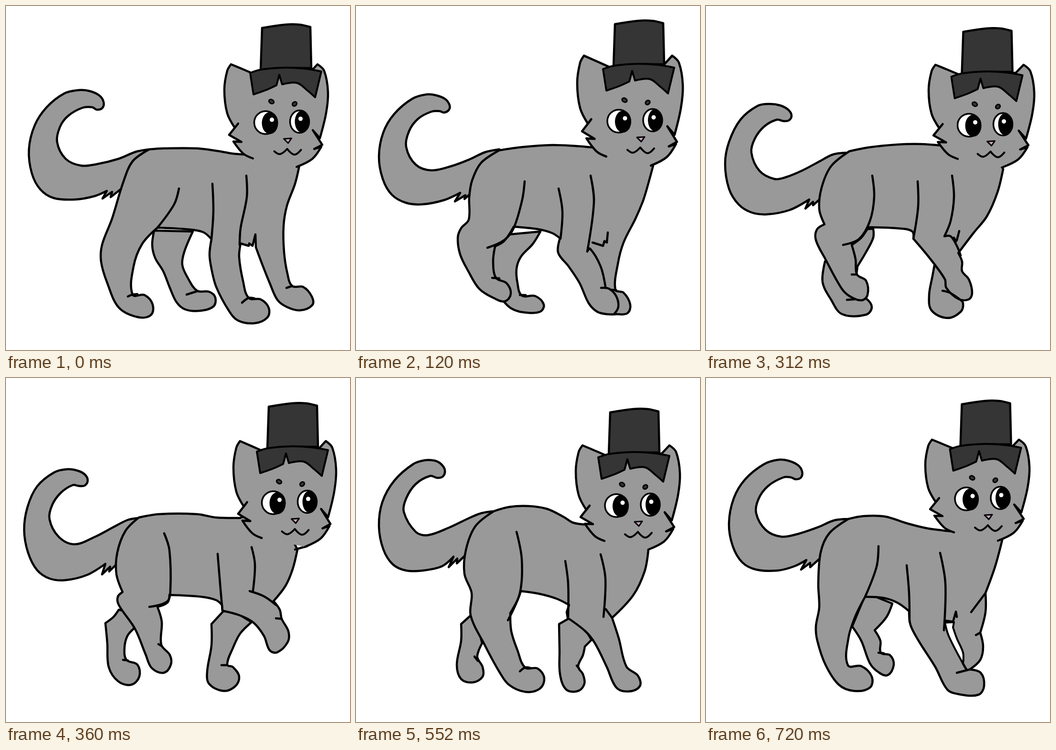
Write an HTML page with a canvas that moves like this. It is 720 by 720 pixels and loops after 0.84 s.

```html
<!DOCTYPE html>
<html>
<head>
<meta charset="utf-8">
<title>Walking cat</title>
<style>
html, body { margin: 0; height: 100%; overflow: hidden; background: #fff; }
canvas { display: block; }
</style>
</head>
<body>
<canvas id="stage" width="720" height="720"></canvas>
<script>
const ctx = document.getElementById('stage').getContext('2d');
const STEP = 120, FUR = '#999', HAT = '#353535';

// Smooth curve through "x,y" points; "!" after a point makes it a corner.
function curve(text) {
  const pts = text.trim().split(/\s+/).map(s => {
    const [x, y] = s.replace('!', '').split(',').map(Number);
    return { x, y, corner: s.endsWith('!') };
  });
  const last = pts.length - 1;
  const handle = (i, length) => {
    const p = pts[i], a = pts[i - 1], b = pts[i + 1];
    if (p.corner || !a || !b) return [p.x, p.y];
    const k = length / 3 / Math.hypot(b.x - a.x, b.y - a.y);
    return [p.x + (b.x - a.x) * k, p.y + (b.y - a.y) * k];
  };
  const path = new Path2D();
  path.moveTo(pts[0].x, pts[0].y);
  for (let i = 0; i < last; i++) {
    const p = pts[i], q = pts[i + 1], d = Math.hypot(q.x - p.x, q.y - p.y);
    path.bezierCurveTo(...handle(i, d), ...handle(i + 1, -d), q.x, q.y);
  }
  return path;
}
const closed = text => curve(text + ' ' + text.trim().split(/\s+/)[0]);

// head: left, top, scale x, scale y; face and hat: offsets
const poses = [
  {
    head: [458, 122, .995, .985], face: [-1.5, -23], hat: [4, -26],
    tail: '300,300! 272,305 235,320 190,331 157,334 125,320 107,285 113,253 130,230 160,213 181,212 190,217 202,213 204,200 195,187 175,178 152,176 122,183 85,212 60,250 48,300 54,350 72,384 100,402 145,405 185,398 211,387! 202,403! 222,389! 219,400! 242,382! 300,340!',
    far: ['310,470! 306,500 312,527 329,555 343,590 357,620 375,635 405,638 434,629 438,610 425,598 400,596 381,570 369,542 373,515 391,472!'],
    body: '300,300! 330,298 400,298 440,303 475,309 502,311! 560,260! 614,334! 605,372 588,418 581,460 582,515 589,560 599,586 622,588 640,608 641,626 615,637 588,630 568,615 552,580 536,540 523,505! 522,478! 516,502! 509,497! 508,502! 491,497! 488,525 496,575 508,611 533,614 550,632 547,652 520,664 485,658 466,637 440,588 430,550 426,520 430,488! 412,473 375,467 317,464! 285,498 267,545 265,604 290,605 307,625 303,647 275,651 236,631 212,580 199,535 201,500 222,445 245,370 265,325',
    lines: ['362,382 352,415 317,464', '432,372 434,430 430,488', '503,355 504,400 491,465 489,500', '255,608 265,604 275,603', '494,621 508,611 520,612', '587,590 599,586', '378,604 400,597']
  },
  {
    head: [464, 104, 1.014, 1.055], face: [5, -26], hat: [10, -34],
    tail: '300,300! 270,306 240,320 200,335 158,344 125,332 105,295 111,262 130,236 158,221 175,220 184,223 194,218 196,208 187,195 168,187 148,185 118,194 80,226 57,265 48,315 56,362 75,395 105,412 140,415 185,406 218,391! 207,409! 229,396! 227,404! 245,388! 300,340!',
    far: ['386,472! 370,498 345,525 336,550 338,580 347,606 375,607 393,625 385,640 350,641 325,633 308,617! 270,560! 300,480!'],
    body: '300,302! 350,295 410,291 460,293 495,296! 560,260! 622,334! 608,385 600,410 585,445 560,495 548,540 543,594 560,600 574,625 568,643 545,645 525,645 505,640 487,622 468,580 445,545 423,516 427,486! 410,475 380,467 330,462! 310,492 291,503! 287,535 293,569 315,580 324,602 312,618 290,612 258,592 235,555 218,520 213,485 220,465 236,447 237,400 243,365 262,328',
    lines: ['353,367 348,405 330,465 310,490 275,506', '424,382 432,430 428,487', '491,355 498,410 484,514! 490,508 512,545 522,587', '495,495 517,502! 520,492! 525,495! 527,474!', '513,590 530,592 545,608 549,630 540,645', '535,594 545,595', '285,569 300,570', '343,605 355,605']
  },
  {
    head: [467, 123, 1.014, .985], face: [5.5, -17.5], hat: [6.5, -18],
    tail: '292,307! 265,311 238,325 200,345 165,359 143,362 112,345 95,307 102,278 122,252 148,238 163,241 174,239 179,229 172,217 155,208 133,205 108,209 72,238 48,285 40,330 48,382 68,415 95,432 128,436 175,427 216,405! 208,424! 224,410! 224,417! 241,402! 300,350!',
    far: ['350,466! 350,485 335,515 317,545! 310,600! 335,612 347,630 335,646 285,645 262,615 244,578 249,535! 300,470!', '479,538! 474,565 467,605 472,637 505,653 533,640 538,622 530,613! 500,560!'],
    body: '300,304! 340,296 400,290 450,289 492,292! 560,260! 622,341! 610,390 588,440 560,475 528,517! 536,535 536,555 550,572 557,600 550,614 528,613 503,590 500,572 470,530 434,487! 432,472 410,466 340,463! 325,485 305,500! 313,530 316,562 335,575 338,605 325,616 300,607 283,590 250,530 230,490 232,468 248,457! 237,425 242,380 262,335',
    lines: ['348,355 352,400 343,450 320,488 287,500', '443,367 444,420 434,487', '515,355 519,400 512,450 499,482! 512,482 525,502 533,522', '495,596 510,600 530,613', '295,615 310,614', '305,562 316,562', '519,485 523,493! 525,490! 530,471!']
  },
  {
    head: [477, 132, .986, 1.015], face: [14.5, -6], hat: [18, -12],
    tail: '278,293! 255,297 225,312 185,333 143,348 110,332 91,295 97,265 115,240 140,224 153,226 165,225 171,214 165,202 150,194 127,191 100,198 65,227 45,270 38,318 46,365 65,402 92,420 125,423 170,412 208,389! 201,411! 218,395! 216,405! 232,389! 280,340!',
    far: ['236,485! 225,500 208,513! 212,555 215,605 235,635 262,642 279,625 275,600 252,590 248,565 254,540 268,524! 260,490!', '455,488! 430,515! 430,560 421,615 425,640 455,655 480,645 488,625 475,605 463,600 475,565 490,535 514,511! 480,490!'],
    body: '278,292! 320,285 400,285 440,292 490,293! 560,260! 610,359! 600,400 585,435 560,467! 573,485 577,504 591,530 590,552 568,574 552,570 540,540 518,512 490,497 453,487! 452,475! 440,465 410,458 342,454! 338,470 317,479! 326,510 325,558 343,580 345,600 330,617 305,607 292,578 270,525 236,475 234,458 244,448! 231,410 233,365 250,320',
    lines: ['331,325 342,360 344,445 337,468 300,479', '443,368 448,430 453,487', '514,354 521,390 517,445', '510,446 540,457 565,475', '565,503 577,504', '319,557 326,561', '245,590 255,591', '451,601 463,601', '630,352 605,359']
  },
  {
    head: [461, 141, 1, 1], face: [0, 0], hat: [0, 0],
    tail: '288,279! 262,283 235,294 195,313 150,329 125,322 100,280 105,252 125,222 155,205 170,209 182,206 186,193 178,180 165,173 145,172 120,180 80,215 55,260 48,310 57,358 77,390 105,403 140,403 180,394 204,374! 194,396! 212,378! 211,388! 230,370! 290,330!',
    far: ['240,497! 220,515! 220,550 211,600 220,630 245,637 265,625 265,605 254,585 257,570 264,555! 255,520!', '446,503! 425,515! 426,570 427,620 440,652 465,655 478,640 475,620 465,604 475,580 479,562! 493,548! 470,510!'],
    body: '288,279! 320,270 360,268 400,274 435,291 455,303 485,307! 560,260! 612,359! 604,405 580,455 536,502! 550,545 566,604 590,623 594,645 570,656 545,648 525,605 500,555 480,530 443,502! 441,490! 446,475! 420,462 385,452 345,446! 338,465 323,492! 325,530 338,570 354,606 380,608 394,628 385,650 355,657 320,642 300,615 270,560 240,497 242,450 227,410 230,360 250,310',
    lines: ['336,322 347,380 343,450 318,507', '438,383 444,430 444,500', '512,369 522,420 518,500', '523,484 536,502', '343,614 354,606 365,607', '462,602 467,608', '248,583 255,592']
  },
  {
    head: [461, 133, 1, 1], face: [0, -8], hat: [0, -7.5],
    tail: '295,286! 265,289 230,303 190,319 150,327 122,315 102,278 107,250 130,220 160,203 178,200 186,204 195,199 197,187 190,174 172,164 150,162 120,170 80,202 54,248 46,300 52,350 72,382 100,398 140,401 180,393 206,374! 195,397! 217,377! 213,389! 235,373! 290,330!',
    far: ['380,460! 362,483 317,506! 300,500! 330,450!', '314,526! 335,533 345,552 332,571 310,570! 290,550!'],
    body: '295,286! 330,278 370,276 410,284 440,297 460,306 485,308! 560,260! 615,352! 605,395 590,440 572,465! 566,495 540,537! 544,560 537,585! 548,603 578,605 590,630 583,653 550,661 522,655 500,615 470,560 440,515 436,475! 415,464 380,458 337,454! 322,480 310,520 306,560 312,601 340,604 357,628 345,652 310,656 280,645 255,605 235,550 233,515 240,480 241,445 233,408 238,365 258,318',
    lines: ['352,338 354,380 335,455', '430,387 437,430 436,500', '498,360 504,420 504,495 520,555 548,603', '302,609 312,601 325,602', '535,612 548,604', '507,497 515,505! 518,492! 524,500! 525,482!', '572,465 555,487', '524,527 540,540']
  },
  {
    head: [460, 129, 1, .97], face: [0, -14], hat: [3.5, -17],
    tail: '298,295! 268,298 235,312 190,327 157,332 125,318 105,283 110,253 130,226 162,208 178,208 188,212 199,208 201,195 192,182 172,173 152,171 122,180 82,212 58,252 48,305 56,352 76,386 105,401 150,403 185,394 210,381! 199,401! 218,387! 218,396! 238,378! 290,340!',
    far: ['390,472! 378,500 353,528! 365,550 366,575 385,580 393,600 380,622 360,615 343,597 325,550 306,520! 335,450!'],
    body: '298,295! 330,289 375,290 420,304 460,314 495,319 515,321! 560,260! 620,339! 605,395 585,450! 585,490 574,533! 580,562 574,590 552,610! 575,617 582,645 570,663 530,662 505,652 480,605 445,550 428,517 425,488! 400,470 370,460 333,458! 312,500 298,545 297,601 325,603 347,625 343,648 310,655 278,642 250,600 233,550 230,520 237,480 235,430 240,365 258,325',
    gap: '500,512! 508,540 538,598! 538,575 525,545 517,522! 519,511!',
    lines: ['361,352 357,395 333,458', '420,392 425,450 426,510', '490,366 501,430 498,528', '525,617 552,610', '502,508 517,510! 523,489! 525,500!', '585,450 555,490', '565,538 574,533', '361,575 372,576', '538,598 545,610']
  }
].map(p => ({
  ...p, tail: closed(p.tail), far: p.far.map(closed), body: closed(p.body),
  gap: p.gap && closed(p.gap), lines: p.lines.map(curve)
}));

const head = curve('520,341! 500,331 479,305! 496,306! 470,291! 489,267! 482,276! 466,245 460,195 466,155 474,141! 500,152 530,165! 640,158! 656,141! 670,155 678,200 674,245 661,298! 646,281! 666,312! 649,321! 664,316! 645,342 612,359!');
const nose = closed('583,301! 599,300! 592,310!');
const mouth = curve('563,327 575,333 590,322! 605,334 619,324');
const crown = closed('532,72! 580,65 610,65 633,70! 635,156! 580,156 529,160!');
const brim = closed('507,166! 530,159 580,155 620,157 656,163! 643,217! 627,203 605,187 574,190! 568,170! 562,192! 540,202 514,211!');

function shape(path, fill, width = 4.5) {
  ctx.lineWidth = width;
  if (fill) {
    ctx.fillStyle = fill;
    ctx.fill(path);
  }
  ctx.stroke(path);
}

function oval(x, y, rx, ry, fill, turn = 0, width = 0) {
  const path = new Path2D();
  path.ellipse(x, y, rx, ry, turn, 0, 7);
  ctx.fillStyle = fill;
  ctx.fill(path);
  if (width) shape(path, null, width);
}

function placed(dx, dy, paint) {
  ctx.save();
  ctx.translate(dx, dy);
  paint();
  ctx.restore();
}

function drawFace() {
  oval(545, 267, 24, 24, '#fff', 0, 3.5);
  oval(554, 268, 17, 23, '#000');
  oval(558, 261, 4.5, 4.5, '#fff');
  oval(616, 265, 20, 23.5, '#fff', 0, 3.5);
  oval(621, 265, 15, 23, '#000');
  oval(618, 259, 4.5, 4.5, '#fff');
  oval(557, 223, 5.5, 4, HAT, .5, 3);
  oval(605.5, 228, 5, 4, HAT, -.7, 3);
  shape(nose, '#c9a9c4', 3);
  shape(mouth, null, 4);
}

function drawHat() {
  shape(crown, HAT);
  shape(brim, HAT, 4);
}

function draw(pose) {
  ctx.fillStyle = '#fff';
  ctx.fillRect(0, 0, 720, 720);
  shape(pose.tail, FUR);
  pose.far.forEach(leg => shape(leg, FUR));
  shape(pose.body, FUR);
  if (pose.gap) shape(pose.gap, '#fff', 4);
  pose.lines.forEach(line => shape(line));

  const [left, top, sx, sy] = pose.head;
  placed(left, top, () => {
    ctx.scale(sx, sy);
    ctx.translate(-461, -141);
    shape(head, FUR);
  });
  placed(...pose.face, drawFace);
  placed(...pose.hat, drawHat);
}

ctx.lineJoin = ctx.lineCap = 'round';
function tick() {
  draw(poses[Math.floor(performance.now() / STEP) % poses.length]);
  requestAnimationFrame(tick);
}
tick();
</script>
</body>
</html>
```
